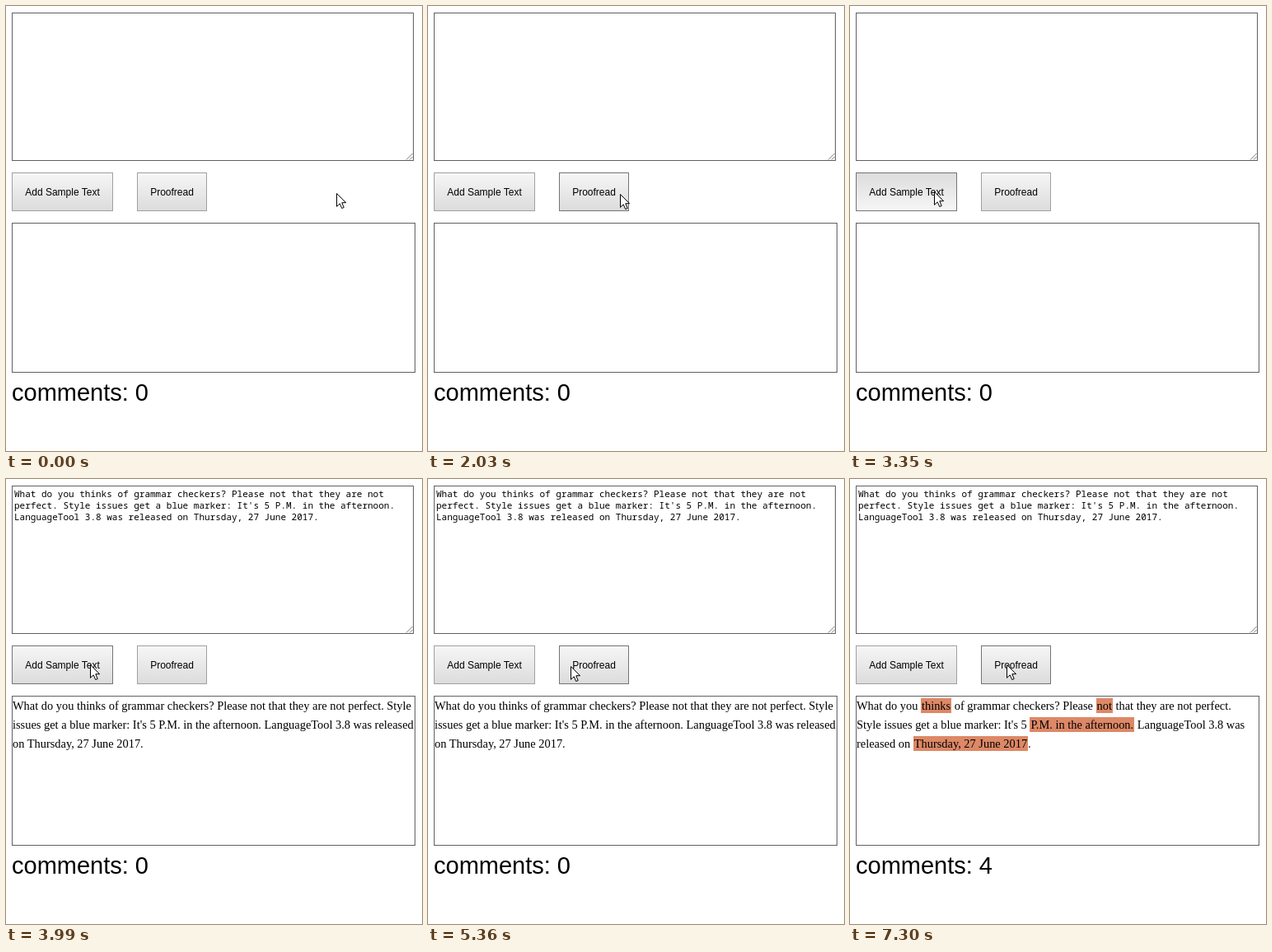
Animation of 505x540 px, one loop 8000 ms. Source, as an HTML page:

```html
<!DOCTYPE html>
<html lang="en">
<head>
<meta charset="utf-8">
<title>Proofreading demo</title>
<style>
  html, body { margin: 0; width: 100%; height: 100%; overflow: hidden; background: #fff; color: #000; }
  body > * { position: absolute; box-sizing: border-box; white-space: pre; }
  .box { border: 1px solid #606060; left: 7px; }
  #input { top: 8px; width: 488px; height: 180px; padding: 2px; font: 11px/14px "Noto Sans Mono", monospace; }
  #output { top: 263px; width: 490px; height: 182px; font: 14.4px/23px "Liberation Serif", serif; }
  #output mark { background: #dd8866; color: inherit; padding: 1px; }
  .button {
    top: 202px; height: 47px; border: 1px solid #a0a0a0;
    display: flex; align-items: center; justify-content: center;
    font: 12px "Liberation Sans", sans-serif;
    background: linear-gradient(#f6f6f6, #dcdcdc);
  }
  .button.hover { border-color: #747474; }
  .button.pressed { background: linear-gradient(#dcdcdc, #f6f6f6); }
  #add { left: 7px; width: 123px; }
  #proofread { left: 159px; width: 85px; }
  #comments { left: 7px; top: 452px; font: 29px/34px "Liberation Sans", sans-serif; }
  #grip { left: 485px; top: 178px; }
  #cursor { left: 0; top: 0; }
</style>
</head>
<body>
<div id="input" class="box"></div>
<svg id="grip" width="9" height="9" fill="none" stroke="#777"><path d="M1 8.5 8.5 1M5 8.5 8.5 5"/></svg>
<div id="add" class="button">Add Sample Text</div>
<div id="proofread" class="button">Proofread</div>
<div id="output" class="box"></div>
<div id="comments"></div>
<svg id="cursor" width="13" height="20" fill="#fff" stroke="#000">
  <path d="M.5 .5V16.3L4.2 12.8 6.7 18.5 9.2 17.5 6.8 11.7H11.6Z"/>
</svg>
<script>
const LOOP = 8000;
const $ = id => document.getElementById(id);

const typed = `What do you thinks of grammar checkers? Please not that they are not
perfect. Style issues get a blue marker: It's 5 P.M. in the afternoon.
LanguageTool 3.8 was released on Thursday, 27 June 2017.`;
const plain = `What do you thinks of grammar checkers? Please not that they are not perfect. Style
issues get a blue marker: It's 5 P.M. in the afternoon. LanguageTool 3.8 was released
on Thursday, 27 June 2017.`;
const marked = `What do you <mark>thinks</mark> of grammar checkers? Please <mark>not</mark> that they are not perfect.
Style issues get a blue marker: It's 5 <mark>P.M. in the afternoon.</mark> LanguageTool 3.8 was
released on <mark>Thursday, 27 June 2017</mark>.`;

const linear = u => u;
const easeIn = u => u ** 1.7;
const easeOut = u => 1 - (1 - u) ** 1.7;
const glide = u => (1 - Math.cos(Math.PI * u ** 0.76)) / 2;
const dip = u => 2 * Math.sin(Math.PI * u);

// Pointer moves: first and last change, number of steps, x range, easing, y(u)
const moves = [
  [860, 1640, 11, 401, 306, easeIn, () => 227],
  [1720, 2490, 11, 306, 145, linear, u => 227 + Math.sin(Math.PI * u)],
  [2570, 2890, 5, 145, 102, easeOut, u => 227 - 2 * u],
  [4900, 5670, 11, 102, 190, glide, u => 225 + dip(u)]
];

function pointerAt(t) {
  let [x, y] = [401, 227];
  for (const [first, last, steps, from, to, ease, height] of moves) {
    if (t < first) break;
    const gap = (last - first) / (steps - 1);
    const u = Math.min(steps, Math.floor((t - first + 3) / gap) + 1) / steps;
    x = Math.round(from + (to - from) * ease(u));
    y = Math.round(height(u));
  }
  return [x, y];
}

function setHTML(el, html) {
  if (el.shown !== html) el.innerHTML = el.shown = html;
}

function styleButton(id, left, right, x, pressed) {
  const { classList } = $(id);
  classList.toggle("hover", x >= left && x < right);
  classList.toggle("pressed", pressed);
}

function draw() {
  const t = performance.now() % LOOP;
  const [x, y] = pointerAt(t);
  $("cursor").style.transform = `translate(${x}px, ${y}px)`;
  styleButton("add", 7, 130, x, t >= 3350 && t < 3890);
  styleButton("proofread", 159, 244, x, t >= 6230 && t < 7150);
  setHTML($("input"), t < 3890 ? "" : typed);
  setHTML($("output"), t < 3990 ? "" : t < 7300 ? plain : marked);
  setHTML($("comments"), "comments: " + (t < 7300 ? 0 : 4));
  requestAnimationFrame(draw);
}
draw();
</script>
</body>
</html>
```
